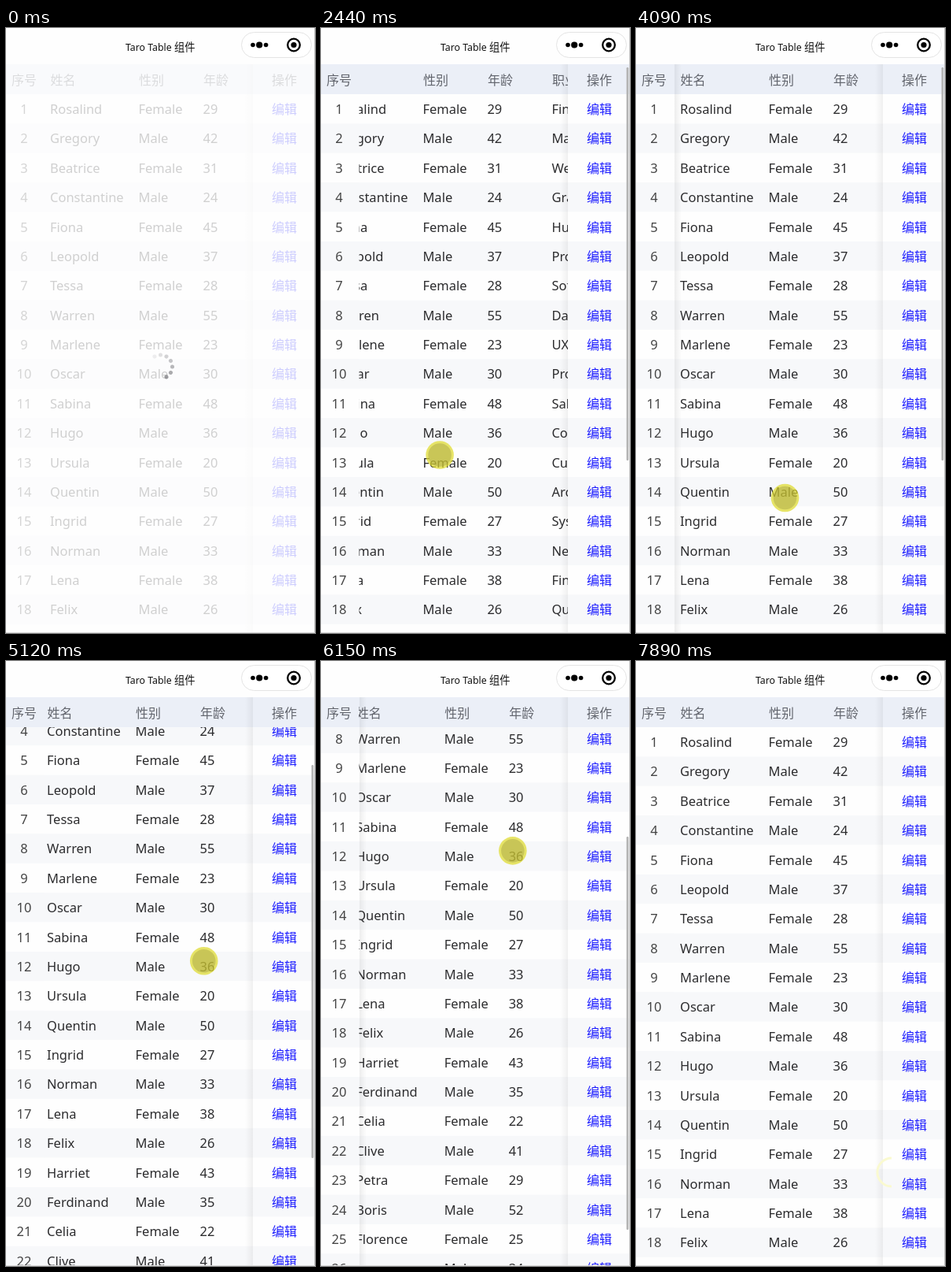
An HTML page that plays this animation: 393x768 px, repeating every 8.27 s.

```html
<!DOCTYPE html>
<html lang="zh-CN">
<head>
<meta charset="utf-8">
<title>Taro Table 组件</title>
<style>
  html, body { margin: 0; width: 100%; height: 100%; overflow: hidden; background: #fdfdfd; }
  svg { display: block; width: 393px; height: 768px; }
  text { font: 16.5px "Noto Sans", "Noto Sans CJK SC", "Noto Sans CJK", sans-serif; fill: #2c2c2e; }
  .cjk { font: 16px "Noto Sans CJK SC", "Noto Sans CJK", sans-serif; }
  .head { fill: #62656d; }
  .num { text-anchor: middle; fill: #444; }
  .link { fill: #2020ff; }
  .title { fill: #111; }
</style>
</head>
<body>
<svg viewBox="0 0 393 768" xmlns="http://www.w3.org/2000/svg">
  <defs>
    <linearGradient id="fadeRight">
      <stop offset="0" stop-opacity=".065"/>
      <stop offset="1" stop-opacity="0"/>
    </linearGradient>
    <linearGradient id="fadeLeft">
      <stop offset="0" stop-opacity="0"/>
      <stop offset="1" stop-opacity=".055"/>
    </linearGradient>
  </defs>
  <rect width="393" height="768" fill="#fefefe"/>
  <g id="cells"></g>
  <g id="numbers"></g>
  <g id="links"></g>
  <rect y="46" width="392" height="38" fill="#ebeff7"/>
  <g id="heads"></g>
  <rect y="46" width="48" height="38" fill="#ebeff7"/>
  <rect x="314" y="46" width="78" height="38" fill="#ebeff7"/>
  <text class="cjk head" x="7" y="72">序号</text>
  <text class="cjk head" x="338" y="72">操作</text>
  <rect id="leftShadow" x="49" y="46" width="9" height="722" fill="url(#fadeRight)"/>
  <rect x="304" y="46" width="10" height="722" fill="url(#fadeLeft)"/>
  <rect id="bar" x="388.5" width="2.7" height="499" rx="1.2" fill="#b4b4b4"/>

  <g id="loading">
    <rect y="46" width="392" height="722" fill="#fefefe" opacity=".78"/>
    <g id="spinner"></g>
  </g>

  <rect width="393" height="46" fill="#fefefe"/>
  <text class="title" x="152" y="29" style="font-size:12.3px">Taro Table</text>
  <text class="cjk title" x="214" y="29" style="font-size:13.3px">组件</text>
  <rect x="299.5" y="5.5" width="89" height="32" rx="16" fill="#fff" stroke="#e4e4e4"/>
  <circle cx="314" cy="21.5" r="2.8"/>
  <circle cx="322.2" cy="21.5" r="4.1"/>
  <circle cx="330.6" cy="21.5" r="2.8"/>
  <circle cx="366" cy="21.5" r="7.8" fill="none" stroke="#000" stroke-width="2.3"/>
  <circle cx="366" cy="21.5" r="3.6"/>

  <path id="trace" d="M325 631 A18 18 0 0 0 325 667" fill="none" stroke="#fafad0" stroke-width="3"/>
  <g id="pointer">
    <circle r="17.8" fill="#deda28" fill-opacity=".7"/>
    <circle r="14.8" fill="#96913c" fill-opacity=".36"/>
  </g>
  <path d="M392.5 0V768" stroke="#c6c6c6"/>
  <path d="M0 767.5H393" stroke="#dcdcdc"/>
</svg>
<script>
const LOOP = 8270, TOP = 84, ROW = 37.38;
const MAX_X = 253, MAX_Y = 332.7;
const $ = id => document.getElementById(id);

// name | age | job | address
const people = `Rosalind|29|Financial A...|718 Tansy St
Gregory|42|Marketing ...|463 Reed Ave
Beatrice|31|Web Devel...|106 Hazel Ln
Constantine|24|Graphic De...|527 Yew Blvd
Fiona|45|Human Res...|241 Fir Dr
Leopold|37|Project Ma...|358 Alder Rd
Tessa|28|Software En...|739 Quince Ct
Warren|55|Data Scient...|862 Reed Ave
Marlene|23|UX Designer|419 Hazel St
Oscar|30|Product Ma...|635 Yew Ave
Sabina|48|Sales Mana...|947 Tansy Blvd
Hugo|36|Content Wr...|172 Fir Rd
Ursula|20|Customer S...|384 Reed Ct
Quentin|50|Architect|591 Hazel Ln
Ingrid|27|Systems An...|426 Yew Blvd
Norman|33|Network A...|813 Alder Dr
Lena|38|Financial A...|678 Quince Rd
Felix|26|Quality Ass...|352 Tansy St
Harriet|43
Ferdinand|35
Celia|22
Clive|41
Petra|29
Boris|52
Florence|25
Lawrence|34
Zoe|47`.split('\n').map(line => line.split('|'));

const columns = { 姓名: 56, 性别: 168.5, 年龄: 250.5, 职业: 332.5, 地址: 454.5 };
const columnX = Object.values(columns);

const text = (x, y, s, cls = '') => `<text x="${x}" y="${y}" class="${cls}">${s}</text>`;

// Striped block of rows; cell(i, baseline) returns the markup of one row.
function fillRows(id, x, width, cell) {
  for (let i = 0; i <= people.length; i++) {
    const y = TOP + i * ROW;
    $(id).innerHTML +=
      `<rect x="${x}" y="${y}" width="${width}" height="${ROW + .1}" fill="${i % 2 ? '#f7f8fa' : '#fefefe'}"/>` +
      (people[i] ? cell(i, y + 25) : '');
  }
}

fillRows('cells', 0, 660, (i, y) => {
  const [name, ...rest] = people[i];
  return [name, i % 2 ? 'Male' : 'Female', ...rest].map((s, c) => text(columnX[c], y, s)).join('');
});
fillRows('numbers', 0, 48.5, (i, y) => text(23, y, i + 1, 'num'));
fillRows('links', 314, 78, (i, y) => text(338, y, '编辑', 'cjk link'));
$('heads').innerHTML = Object.entries(columns).map(([s, x]) => text(x + .5, 72, s, 'cjk head')).join('');

for (let i = 0; i < 7; i++) {
  $('spinner').innerHTML +=
    `<circle cx="15" r="2.5" transform="rotate(${60 - i * 30})" fill="#77777c" opacity="${.72 - i * .1}"/>`;
}

const clamp = (v, lo, hi) => Math.min(hi, Math.max(lo, v));
const mix = (a, b, p) => a + (b - a) * p;
const within = (t, a, b) => t >= a && t < b;

// Smooth 0 to 1 between two times.
function ramp(t, from, to) {
  const p = clamp((t - from) / (to - from), 0, 1);
  return p * p * (3 - 2 * p);
}

// Pointer stops: [time, x, y]
const stops = [
  [1560, 415, 590], [2250, 201.5, 542], [2750, 47, 542], [2900, -20, 542],
  [3560, -20, 582], [4090, 189.5, 596.5], [4330, 257, 509], [4780, 257, 509],
  [5600, 243, 167], [5900, 243, 167], [6736, 247, 508.5], [7420, 334, 649], [7850, 415, 655],
];

function pointerAt(t) {
  let [, x, y] = stops[0];
  for (let i = 1; i < stops.length; i++) {
    const p = ramp(t, stops[i - 1][0], stops[i][0]);
    x = mix(x, stops[i][1], p);
    y = mix(y, stops[i][2], p);
  }
  return [x, y];
}

// Two sideways flings, then a drag in which the table follows the pointer.
function scrollAt(t, px, py) {
  if (t < 4700) return [MAX_X * (ramp(t, 2280, 2928) - ramp(t, 3690, 4070)), 0];
  return [Math.max(0, 255.7 - px), clamp(507 - py, 0, MAX_Y)];
}

const move = (id, x, y) => $(id).setAttribute('transform', `translate(${x} ${y})`);
const show = (id, alpha) => $(id).setAttribute('opacity', +alpha);

function draw(t) {
  const [px, py] = pointerAt(t);
  const [sx, sy] = scrollAt(t, px, py);
  move('cells', -sx, -sy);
  move('numbers', 0, -sy);
  move('links', 0, -sy);
  move('heads', -sx, 0);
  move('bar', 0, 50 + sy * .65);
  move('pointer', px, py);
  show('bar', ramp(t, 1600, 1640) - ramp(t, 4420, 4640) + ramp(t, 4760, 4800) - ramp(t, 7500, 7800));
  show('leftShadow', within(t, 2900, 4300) || within(t, 5200, 7350));
  show('trace', t >= 7570);
  show('loading', t < 1330);
  const step = Math.floor(Math.min(t, 1170) * 12 / 1000);
  $('spinner').setAttribute('transform', `translate(196.5 430) rotate(${step * 30})`);
}

const start = performance.now();
function frame() {
  draw((performance.now() - start) % LOOP);
  requestAnimationFrame(frame);
}
frame();
</script>
</body>
</html>
```
